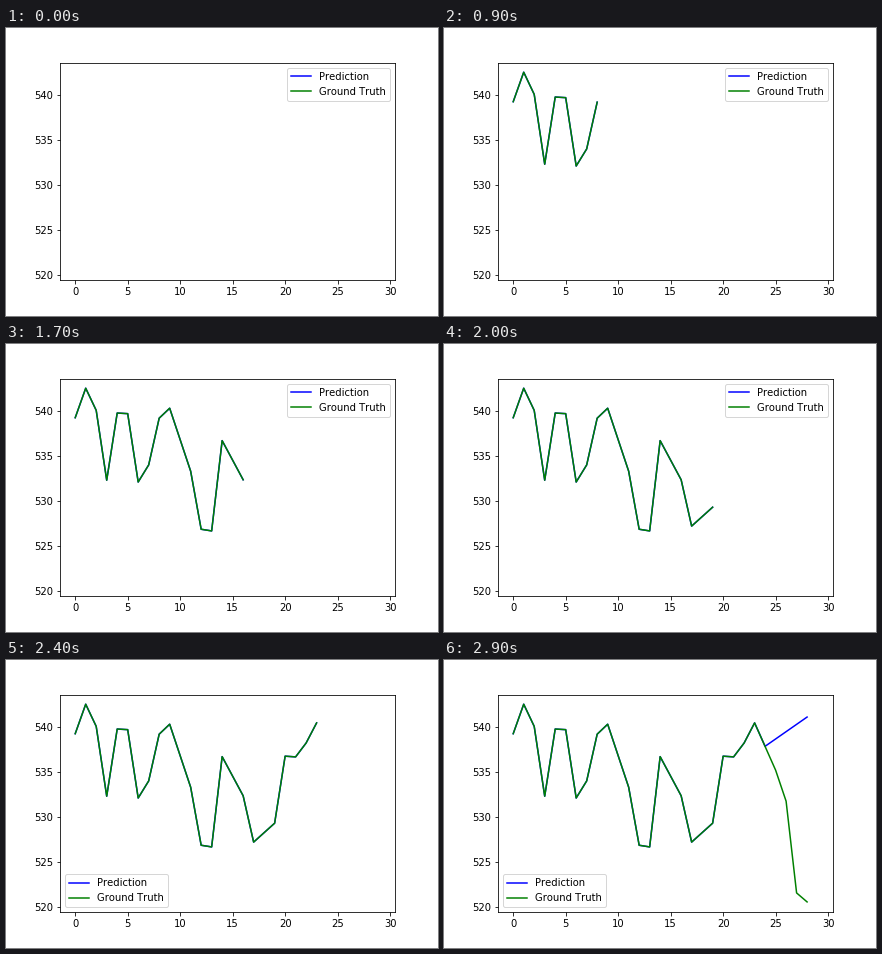
A matplotlib script that plays this animation: 432x288 px, repeating every 3 s.

```python
import numpy as np
import matplotlib.pyplot as plt
from matplotlib.animation import FuncAnimation

STEPS = 30
INTERVAL = 100

# Bends of the curves as (step, value); the series samples the straight
# runs between them at whole steps.
history = [(0, 539.25), (1.48, 544.1), (3, 532.3), (4.5, 543.5), (6, 532.1),
           (7, 534), (8.53, 541.95), (11, 533.3), (12.62, 522.85),
           (14, 536.7), (16, 532.35), (17, 527.2), (19, 529.3),
           (20, 536.75), (21.3, 536.65), (23, 540.45)]
rise = [(24, 537.85), (28, 541.1)]
fall = [(25, 535.2), (26, 531.75), (27, 521.55), (28, 520.55)]

steps = np.arange(STEPS)


def sample(bends):
    return np.interp(steps, *zip(*bends))


# Kerning in whole pixels spaces the legend text.
plt.rcParams.update({"font.family": "DejaVu Sans", "font.size": 10,
                     "text.kerning_factor": 6})

fig, ax = plt.subplots(figsize=(6, 4), dpi=72)
fig.subplots_adjust(left=0.125, right=0.9, bottom=0.125, top=0.88)
ax.set_xlim(-1.45, 30.45)
ax.set_ylim(519.43, 543.6)

series = [
    (ax.plot([], [], "b", lw=1.5, label="Prediction")[0],
     sample(history + rise)),
    (ax.plot([], [], "g", lw=1.5, label="Ground Truth")[0],
     sample(history + fall)),
]
# The legend moves to a free corner when the curves reach it.
ax.legend(loc="best")


def update(count):
    for line, values in series:
        line.set_data(steps[:count], values[:count])
    return [line for line, _ in series]


anim = FuncAnimation(fig, update, frames=STEPS, interval=INTERVAL,
                     init_func=lambda: update(0), repeat=True,
                     repeat_delay=0, blit=False)
plt.show()
```
